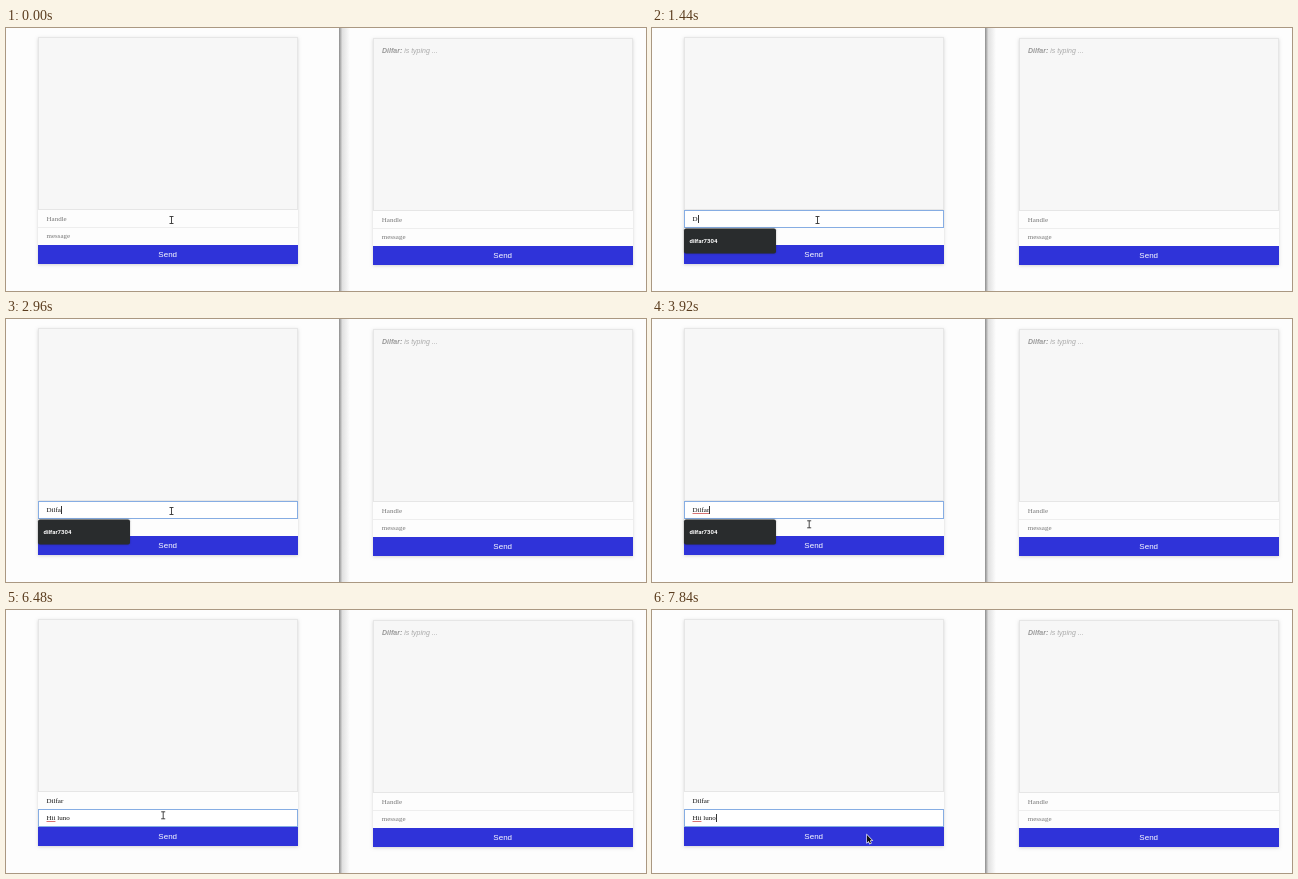
These frames come from a looping animation (640x263 px, 8 s). An HTML page with a canvas:

```html
<!DOCTYPE html>
<html lang="en">
<head>
<meta charset="utf-8">
<title>Chat</title>
<style>
html, body { margin: 0; width: 100%; height: 100%; overflow: hidden; background: #fdfdfd; }
canvas { display: block; }
</style>
</head>
<body>
<canvas id="stage" width="640" height="263"></canvas>
<script>
const ctx = document.getElementById('stage').getContext('2d');
const LOOP = 8000, STEP = 80;
const SERIF = '7px "Liberation Serif", serif';
const SANS = '"Liberation Sans", sans-serif';

// Each entry: [start time, value]
const handleText = [[0, ''], [1360, 'D'], [1520, 'Di'], [1760, 'Dil'], [2080, 'Dill'],
  [2400, 'Dil'], [2720, 'Dilf'], [2960, 'Dilfa'], [3200, 'Dilfar']];
const messageText = [[0, ''], [4640, 'H'], [4800, 'Hi'], [4880, 'Hii'], [5040, 'Hii '],
  [5440, 'Hii l'], [5600, 'Hii lu'], [5840, 'Hii lun'], [6000, 'Hii luno']];
const focus = [[0, ''], [320, 'handle'], [4240, 'message']];
const suggestions = [[0, false], [400, true], [1520, false], [2480, true], [4080, false]];
const caret = [[0, false], [320, true], [720, false], [1040, true], [1200, false], [1360, true],
  [2240, false], [2400, true], [3440, false], [3680, true], [6480, false], [6880, true],
  [7280, false], [7760, true]];
// Pointer stops: time, x, y
const pointer = [[0, 165.5, 192], [3280, 165.5, 192], [3680, 157.2, 205.3], [6560, 157.2, 205.3],
  [7200, 237, 200], [7360, 237, 200], [7600, 236, 220], [7680, 236, 220], [7840, 215, 225], [LOOP, 215, 225]];

const at = (track, t) => track.filter(([start]) => start <= t).pop()[1];

function pointerAt(t) {
  const i = pointer.findIndex(p => p[0] > t);
  const [t0, x0, y0] = pointer[i - 1], [t1, x1, y1] = pointer[i];
  const u = (t - t0) / (t1 - t0), e = u * u * (3 - 2 * u);
  return [x0 + (x1 - x0) * e, y0 + (y1 - y0) * e];
}

function rect(x, y, w, h, color) {
  ctx.fillStyle = color;
  ctx.fillRect(x, y, w, h);
}

function outline(x, y, w, h, color) {
  ctx.strokeStyle = color;
  ctx.lineWidth = 1;
  ctx.strokeRect(x + .5, y + .5, w - 1, h - 1);
}

function text(str, x, y, font, color) {
  ctx.font = font;
  ctx.fillStyle = color;
  ctx.fillText(str, x, y);
  return ctx.measureText(str).width;
}

function field(y, value, placeholder, misspelt, focused, caretOn) {
  const x = 40.5;
  if (focused) {
    rect(32, y, 260, 18, '#fff');
    outline(32, y, 260, 18, '#86ade3');
  }
  text(value || placeholder, x, y + 11, SERIF, value ? '#111' : '#777');
  ctx.font = SERIF;
  if (misspelt) rect(x, y + 12, ctx.measureText(misspelt).width, 1, 'rgba(205,70,70,.75)');
  if (focused && caretOn) rect(Math.round(x + ctx.measureText(value).width), y + 5, 1, 8, '#333');
}

function panel(x, y) {
  ctx.save();
  ctx.shadowColor = 'rgba(0,0,0,.16)';
  ctx.shadowBlur = 3;
  ctx.shadowOffsetY = 1;
  rect(x, y, 260, 227, '#fdfdfd');
  ctx.restore();
  rect(x, y, 260, 173, '#f7f7f7');
  outline(x, y, 260, 173, '#e6e6e6');
  rect(x, y + 190, 260, 1, '#eee');
  rect(x, y + 208, 260, 19, '#2f33d9');
  ctx.textAlign = 'center';
  text('Send', x + 129.7, y + 220, '8px ' + SANS, '#fff');
  ctx.textAlign = 'left';
}

function windowEdge() {
  const shade = ctx.createLinearGradient(333, 0, 344, 0);
  shade.addColorStop(0, '#8c8c8c');
  shade.addColorStop(.15, '#b4b4b4');
  shade.addColorStop(.3, '#e0e0e0');
  shade.addColorStop(1, '#fdfdfd');
  rect(333, 0, 11, 263, shade);
}

function suggestionBox() {
  ctx.save();
  ctx.shadowColor = 'rgba(0,0,0,.3)';
  ctx.shadowBlur = 2;
  ctx.fillStyle = '#292c2d';
  ctx.beginPath();
  ctx.roundRect(32, 200.5, 92, 25, 2);
  ctx.fill();
  ctx.restore();
  text('dilfar7304', 37.5, 215, 'bold 6px Roboto, sans-serif', '#fff');
}

function drawPointer(x, y) {
  ctx.save();
  ctx.translate(x, y);
  ctx.beginPath();
  if (y > 216) {
    [[0, 0], [0, 7.5], [1.7, 6], [2.8, 8.6], [4, 8], [2.9, 5.5], [5, 5.3]].forEach(p => ctx.lineTo(...p));
    ctx.closePath();
    ctx.strokeStyle = '#fff';
    ctx.lineWidth = 1.2;
    ctx.stroke();
    ctx.fillStyle = '#111';
    ctx.fill();
  } else {
    for (const end of [-3.5, 3.5]) {
      ctx.moveTo(-2, end);
      ctx.lineTo(2, end);
    }
    ctx.moveTo(0, -3.5);
    ctx.lineTo(0, 3.5);
    ctx.strokeStyle = '#333';
    ctx.lineWidth = .9;
    ctx.stroke();
  }
  ctx.restore();
}

function draw(t) {
  rect(0, 0, 640, 263, '#fdfdfd');
  windowEdge();

  panel(367, 10);
  const nameWidth = text('Dilfar:', 376, 24.5, 'italic bold 7px ' + SANS, '#999');
  text(' is typing ...', 376 + nameWidth, 24.5, 'italic 7px ' + SANS, '#aaa');
  text('Handle', 375.8, 194, SERIF, '#777');
  text('message', 375.8, 211, SERIF, '#777');

  panel(32, 9);
  const active = at(focus, t), caretOn = at(caret, t);
  const misspeltName = t >= 3280 && t < 4240 ? 'Dilfar' : '';
  const misspeltWord = t >= 5040 ? 'Hii' : '';
  field(182, at(handleText, t), 'Handle', misspeltName, active === 'handle', caretOn);
  field(199, at(messageText, t), 'message', misspeltWord, active === 'message', caretOn);
  if (at(suggestions, t)) suggestionBox();
  drawPointer(...pointerAt(t));
}

const began = performance.now();
function tick() {
  const t = (performance.now() - began) % LOOP;
  draw(Math.floor(t / STEP) * STEP);
  requestAnimationFrame(tick);
}
tick();
</script>
</body>
</html>
```
